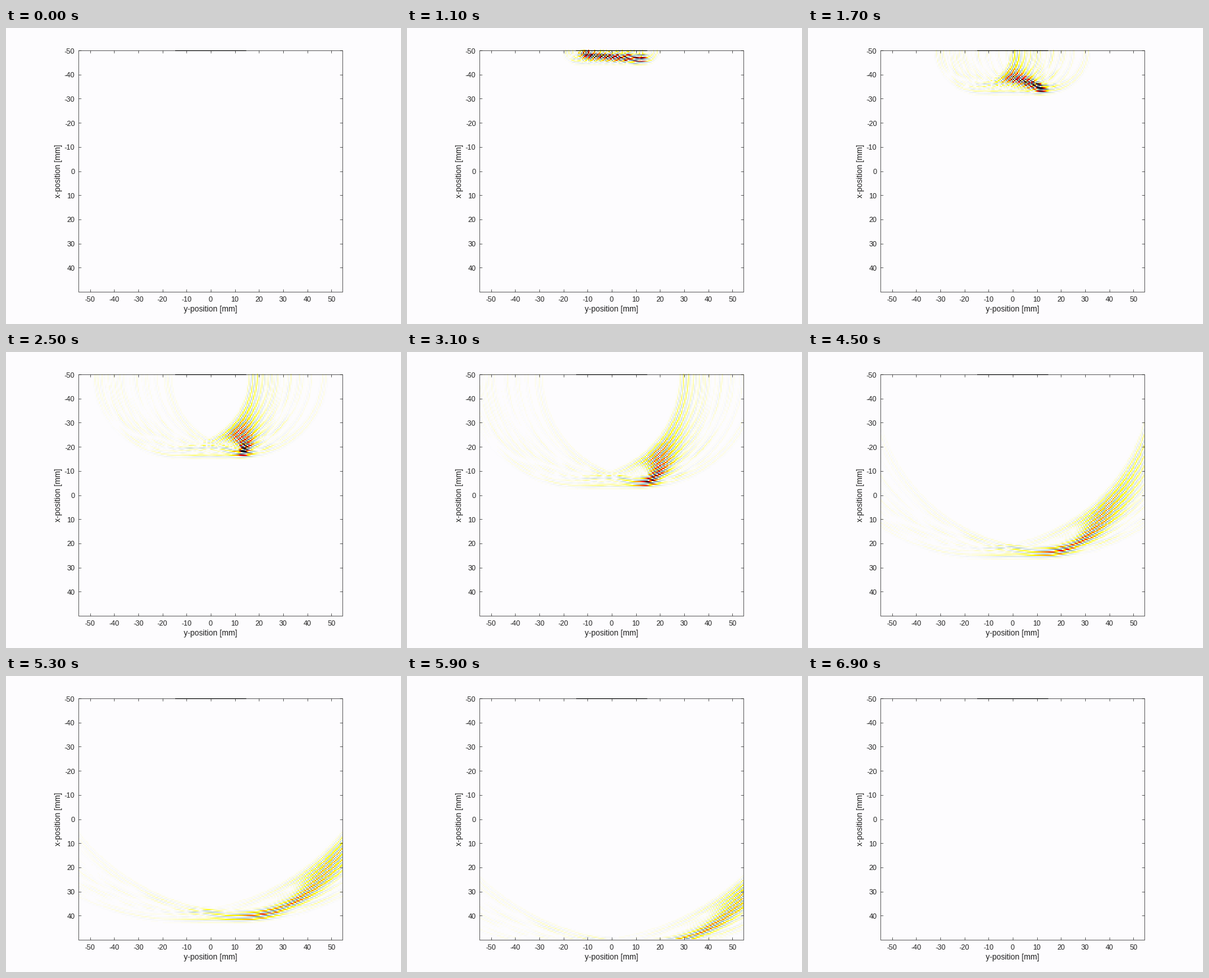
Animation of 600x450 px, one loop 7.2 s. Source, as a matplotlib script:

```python
import numpy as np
import matplotlib.pyplot as plt
from matplotlib import colormaps
from matplotlib.animation import FuncAnimation
from matplotlib.colors import ListedColormap
from matplotlib.patches import Rectangle

W, H, DPI = 600, 450, 72
FRAMES, INTERVAL = 72, 100
LEFT, TOP, RIGHT, BOTTOM = 109.5, 33.5, 510.5, 400.5
PX = 3.667                    # pixels per mm
CX, CY = 311, 217.5           # pixel position of 0 mm
BG, INK = "#fdfcfe", "#1f1f1f"

CELL, ROWS, COLS = 0.5, 200, 219   # simulation grid, cell size in mm
STEP = 2.07                   # mm travelled per frame
START = 18.85                 # mm before the burst centre leaves the array
WAVE, WIDTH = 1.5, 1.95       # wavelength and burst half width in mm
FOCUS = (12.5, 25.0)          # lateral position and depth in mm
REACH = 1.75 * WIDTH


def burst(u):
    return np.exp(-np.abs(u / WIDTH) ** 3) * np.sin(2 * np.pi * u / WAVE)


def simulate():
    """Sum the bursts of all array points, delays wrapped to one period."""
    y = (-54.75 + CELL * np.arange(COLS)).astype(np.float32)
    depth = (CELL * np.arange(ROWS)).astype(np.float32)
    rows, cols = np.ogrid[:ROWS, :COLS]
    field = np.zeros((FRAMES + 1, ROWS, COLS), np.float32)
    for src in np.arange(-14.75, 14.5, CELL):
        delay = -np.hypot(FOCUS[0] - src, FOCUS[1]) % WAVE
        r = np.hypot(depth[:, None], y[None, :] - np.float32(src))
        arrival = r + np.float32(delay + START)
        gain = 1 / np.sqrt(r + np.float32(0.4))
        first = np.ceil((arrival - REACH) / STEP).astype(np.int32)
        for k in range(int(2 * REACH / STEP) + 1):
            n = first + k
            u = n.astype(np.float32) * np.float32(STEP) - arrival
            field[np.minimum(n, FRAMES), rows, cols] += gain * burst(u)
    field = field[:FRAMES]
    return field / (0.8 * field[25].max())


def wave_map():
    """Bluish greys below zero, white at zero, yellow-red-black above."""
    neg = colormaps["bone"](np.linspace(0.27, 1, 128))[:, :3]
    s = np.linspace(1, 0, 128)
    pos = np.stack([s * 8 / 3, s * 8 / 3 - 1, s * 4 - 3], axis=1)
    colors = np.vstack([neg, np.clip(pos, 0, 1)])
    return ListedColormap(colors * np.array([253, 252, 254]) / 255)


plt.rcParams["font.family"] = "Liberation Sans"
fig = plt.figure(figsize=(W / DPI, H / DPI), dpi=DPI, facecolor=BG)
ax = fig.add_axes([0, 0, 1, 1])

field = simulate()
image = ax.imshow(field[0], cmap=wave_map(), vmin=-1, vmax=1, aspect="auto",
                  extent=(LEFT, RIGHT, BOTTOM, TOP), interpolation="nearest")
ax.set(xlim=(0, W), ylim=(H, 0))
ax.axis("off")


def line(x, y):
    ax.plot(x, y, color=INK, lw=0.65, solid_capstyle="butt")


def label(x, y, text, size=11, **kw):
    ax.text(x, y, text, size=size, color=INK, va="baseline", **kw)


line([LEFT, RIGHT, RIGHT, LEFT, LEFT], [TOP, TOP, BOTTOM, BOTTOM, TOP])
for mm in range(-50, 51, 10):
    x = CX + mm * PX
    line([x, x], [BOTTOM, BOTTOM - 4])
    line([x, x], [TOP, TOP + 4])
    label(x, 416, str(mm), ha="center")
for mm in range(-50, 41, 10):
    y = CY + mm * PX
    line([LEFT, LEFT + 4], [y, y])
    line([RIGHT, RIGHT - 4], [y, y])
    label(104.8, y + 4.5, str(mm), ha="right")
label(310.5, 430.5, "y-position [mm]", 12, ha="center")
label(83.5, 217.5, "x-position [mm]", 12, ha="center", rotation=90,
      rotation_mode="anchor")
ax.add_patch(Rectangle((256.5, 33.6), 108, 1.6, color="black", lw=0, zorder=5))


def update(n):
    image.set_data(field[n])
    return [image]


anim = FuncAnimation(fig, update, frames=FRAMES, interval=INTERVAL,
                     repeat=True, repeat_delay=0, blit=False)
plt.show()
```
